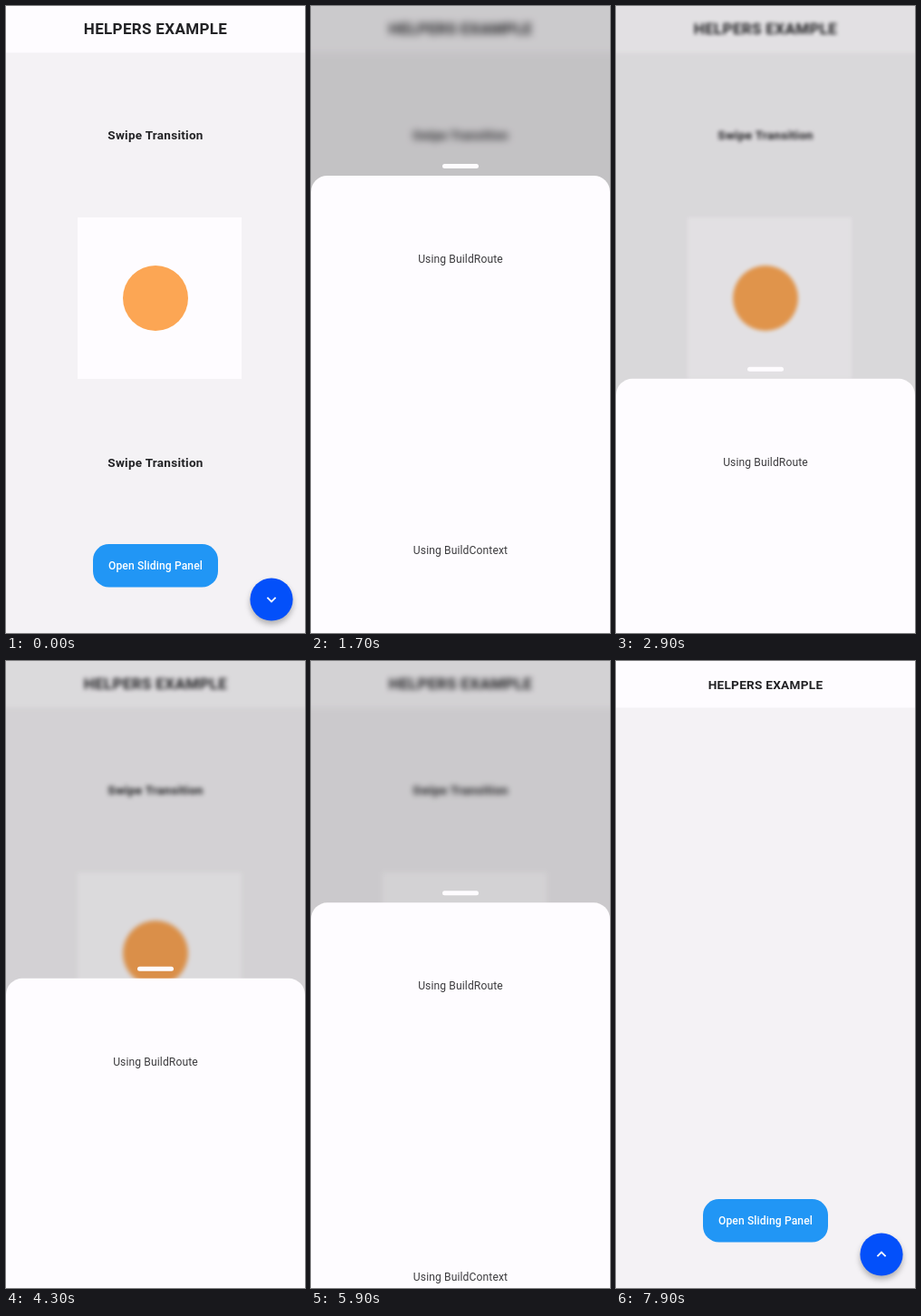
Write an HTML page with a canvas that moves like this. It is 330x691 px and loops after 8000 ms.

```html
<!DOCTYPE html>
<html lang="en">
<head>
<meta charset="utf-8">
<title>Helpers example</title>
<style>
html, body { margin: 0; width: 100%; height: 100%; overflow: hidden; background: #f4f2f5; }
#stage { position: relative; width: 330px; height: 691px; overflow: hidden; font-family: Roboto, sans-serif; }
#stage div, canvas { position: absolute; }
#scene { left: -20px; top: -20px; width: 370px; height: 731px; }
#scene canvas { left: 0; top: 0; }
#view { left: 20px; top: 20px; width: 330px; height: 691px; }
.label { left: 0; width: 330px; height: 20px; line-height: 20px; text-align: center; white-space: nowrap; }
.section { left: 0; width: 330px; height: 180px; overflow: hidden; }
.section .label { top: 80px; font-size: 13.5px; }
#title, .section .label { font-weight: 600; letter-spacing: .02em; color: #222225; }
#action { top: 607px; font-size: 12.1px; font-weight: 500; letter-spacing: .01em; color: #fff; }
#dim { inset: 0; background: #000; }
#panel { left: 0; top: 0; width: 330px; height: 720px; background: #fefcff; border-radius: 18px 18px 0 0; }
#panel .label { font-size: 12.1px; letter-spacing: .01em; color: #3c3b3e; }
#grip { left: 145px; top: -13.5px; width: 40px; height: 5px; border-radius: 3px; background: #fefcff; }
</style>
</head>
<body>
<div id="stage">
  <div id="scene">
    <canvas id="shapes" width="370" height="731"></canvas>
    <div id="view">
      <div class="label" id="title">HELPERS EXAMPLE</div>
      <div class="section" style="top:52px"><div class="label" id="upper">Swipe Transition</div></div>
      <div class="section" style="top:413px"><div class="label" id="lower">Swipe Transition</div></div>
      <div class="label" id="action">Open Sliding Panel</div>
    </div>
  </div>
  <div id="dim"></div>
  <div id="panel">
    <div id="grip"></div>
    <div class="label" style="top:82px">Using BuildRoute</div>
    <div class="label" style="top:403px">Using BuildContext</div>
  </div>
</div>
<script>
const $ = id => document.getElementById(id);
const ctx = $('shapes').getContext('2d');
const LOOP = 8000, OPEN = 187, CLOSED = 706, HEIGHT = 691;

const clamp = v => Math.min(1, Math.max(0, v));
const mix = (a, b, k) => a + (b - a) * k;
const smooth = k => k * k * (3 - 2 * k);
const easeOut = k => 1 - (1 - k) ** 3;
const span = (t, a, b) => clamp((t - a) / (b - a));

// Panel top over time: [ms, y, easing of the move that ends here]
const drag = [
  [60, CLOSED], [800, OPEN, easeOut], [1850, OPEN], [2450, 570, smooth],
  [2900, 412, k => k * k], [3450, 200, easeOut], [3750, 210],
  [4300, 348.5, k => k * (1 + k) / 2], [4850, 590, easeOut],
  [5100, 558, k => k * k], [5900, 267], [6250, OPEN, easeOut],
  [6420, OPEN], [6950, CLOSED, smooth]
];

function panelTop(t) {
  for (let i = 1; i < drag.length; i++) {
    const [t0, y0] = drag[i - 1], [t1, y1, ease] = drag[i];
    if (t < t1) {
      const k = span(t, t0, t1);
      return mix(y0, y1, ease ? ease(k) : k);
    }
  }
  return CLOSED;
}

function disc(x, y, r, color) {
  ctx.fillStyle = color;
  ctx.beginPath();
  ctx.arc(x, y, r, 0, 7);
  ctx.fill();
}

function drawShapes(hide) {
  ctx.setTransform(1, 0, 0, 1, 20, 20);
  ctx.fillStyle = '#f4f2f5';
  ctx.fillRect(-20, -20, 370, 731);
  ctx.fillStyle = '#fefcff';
  ctx.fillRect(-20, -20, 370, 71.5);

  ctx.globalAlpha = 1 - hide;
  ctx.fillRect(79, 233, 181, 178);
  disc(165, 322, 36, '#fca654');
  ctx.globalAlpha = 1;

  ctx.fillStyle = '#2196f5';
  ctx.beginPath();
  ctx.roundRect(96, 593, 138, 47.5, 17.6);
  ctx.fill();

  ctx.save();
  ctx.shadowColor = 'rgba(0,0,0,.28)';
  ctx.shadowBlur = 6;
  ctx.shadowOffsetY = 4;
  disc(293, 654, 23.6, '#0350fa');
  ctx.restore();

  ctx.save();
  ctx.translate(293, 654);
  ctx.rotate(Math.PI * hide);
  ctx.strokeStyle = '#fff';
  ctx.lineWidth = 1.8;
  ctx.beginPath();
  ctx.moveTo(-4.6, -2.2);
  ctx.lineTo(0, 2.4);
  ctx.lineTo(4.6, -2.2);
  ctx.stroke();
  ctx.restore();
}

function render(t) {
  const top = panelTop(t);
  const open = clamp((HEIGHT - top) / (HEIGHT - OPEN));
  const hide = smooth(span(t, 7330, 7830));

  drawShapes(hide);
  $('scene').style.filter = open > 0 ? `blur(${4 * open}px)` : 'none';
  $('dim').style.opacity = 0.2 * open;
  $('panel').style.transform = `translateY(${top}px)`;

  $('title').style.fontSize = mix(17, 13.6, hide) + 'px';
  $('title').style.top = mix(15, 16, hide) + 'px';
  $('upper').style.transform = `translateY(${-110 * hide}px)`;
  $('lower').style.transform = `translateY(${110 * hide}px)`;
  for (const id of ['upper', 'lower']) $(id).style.opacity = 1 - hide;
}

const start = performance.now();
function tick(now) {
  render(Math.max(0, now - start) % LOOP);
  requestAnimationFrame(tick);
}
render(0);
requestAnimationFrame(tick);
</script>
</body>
</html>
```
